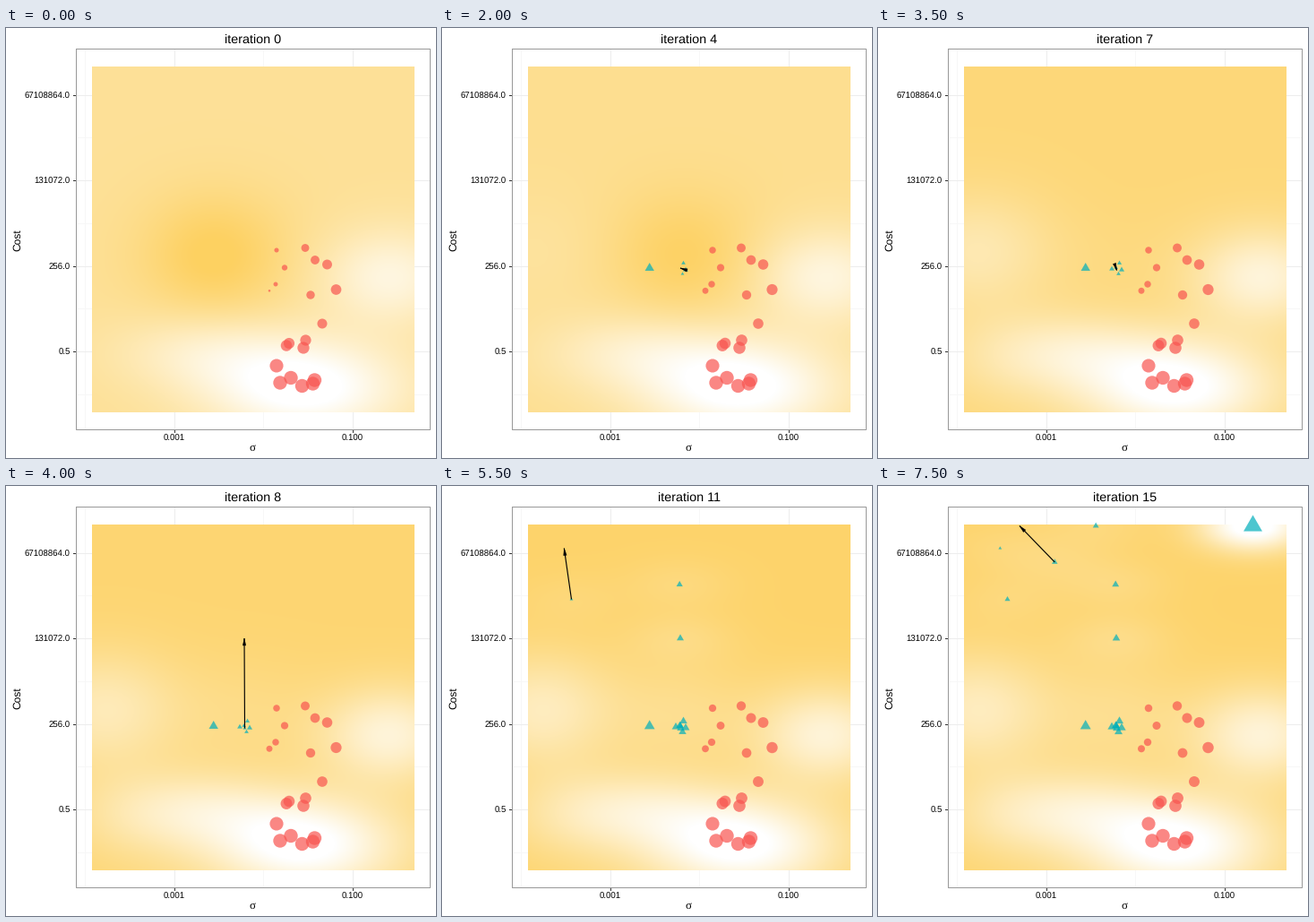
A matplotlib script for the animation above (8000 ms loop, 480 px wide and 480 px high).

```python
import numpy as np
import matplotlib.pyplot as plt
from matplotlib.animation import FuncAnimation
from matplotlib.collections import PatchCollection
from matplotlib.patches import Circle, Polygon

plt.rcParams.update({"path.snap": False, "text.hinting": "none"})

SIZE, DPI = 480, 100
PX = 72 / DPI
STEPS, STEP_MS = 16, 500
R_MIN, R_MAX = 1.28, 7.7
RED, TEAL = (0.973, 0.333, 0.314), (0.0, 0.686, 0.733)
GOLD = np.array([253, 209, 98]) / 255
LEFT, RIGHT, TOP, BOTTOM = 96, 456, 43, 429
PANEL = (78.5, 473.5, 23.5, 448.5)

# points of the initial design
DESIGN = [(302, 248), (334, 245.5), (345, 259), (358.5, 264), (311, 267.5),
          (301, 286), (294, 293.3), (340, 298), (368.5, 292), (353, 330),
          (334.5, 348.5), (332, 357), (316, 352), (313, 354.5), (302, 377),
          (318, 390.5), (306, 396), (330.5, 399.5), (344.5, 393), (342.5, 397)]
# points proposed by the optimiser, in order
PROPOSED = [(231.7, 268), (268.5, 274.5), (269.5, 262.5), (272, 270),
            (266, 268), (261, 269), (265.5, 267.5), (266.5, 270.5),
            (266, 170), (265.2, 110), (144.5, 126.5), (136.3, 69.5),
            (243.2, 44.5), (418.5, 44.5), (197.3, 85), (158, 44.5)]

# broad features: centre, spread, height before and after learning
FEATURES = [
    (428, 278, 54, 38, -.46, -.68),
    (333, 401, 78, 38, -.75, -1),
    (220, 361, 70, 30, -.30, -.42),
    (110, 250, 58, 46, 0, -.52),
    (140, 372, 58, 38, 0, -.24),
    (265, 256, 62, 46, 0, -.22),
]
GX, GY = np.meshgrid(np.arange(LEFT, RIGHT) + .5, np.arange(TOP, BOTTOM) + .5)


def ease(x, a, b):
    t = np.clip((x - a) / (b - a), 0, 1)
    return t * t * (3 - 2 * t)


def mix(a, b, t):
    return a + (b - a) * t


def bump(cx, cy, sx, sy):
    return np.exp(-((GX - cx) / sx) ** 2 / 2 - ((GY - cy) / sy) ** 2 / 2)


def loss(x, y):
    """Test function: high at the right and bottom, low in the centre and on top."""
    side = .5 * max(0, (x - 294) / 74) ** 1.25
    floor = ease(y, 318, 386)
    valley = .14 * np.exp(-((x - 266) / 17) ** 2)
    up, left = max(0, (230 - y) / 186), max(0, (268 - x) / 130)
    top = min(1, 3 * up) * (.14 + .05 * up + .045 * left)
    return 1 - (1 - side) * (1 - floor) - max(valley, top)


def surface(i, seen, low):
    learned = ease(i, 2, 10)
    depth = np.full(GX.shape, mix(.66, .94, learned))
    depth += mix(.37, 0, learned) * bump(mix(233, 269, ease(i, 0, 2)), 254, 57, 48)
    for *place, before, after in FEATURES:
        depth += mix(before, after, learned) * bump(*place)
    for x, y in seen:
        if y < 200:
            depth -= (.08 + loss(x, y) - low) * bump(x, y, 42, 20)
    return 1 - np.clip(depth, 0, 1)[..., None] * (1 - GOLD)


def radius(x, y, low):
    share = max(0, (loss(x, y) - low) / (1 - low))
    return R_MIN + (R_MAX - R_MIN) * min(1, share) ** .5


def triangle(x, y, r):
    r *= 1.1
    return Polygon([(x, y - 1.555 * r), (x - 1.347 * r, y + .778 * r),
                    (x + 1.347 * r, y + .778 * r)])


def arrow(start, tip, length=8, half=1.7):
    start, tip = np.array(start), np.array(tip)
    along = (tip - start) / np.hypot(*(tip - start))
    across = along[::-1] * (-1, 1)
    base = tip - length * along
    head = Polygon([tip, base + half * across, base - half * across],
                   facecolor="black", edgecolor="black", lw=.4 * PX, zorder=6)
    return [segment(*zip(start, tip), "black", 1.15, 6), ax.add_patch(head)]


def label(x, y, s, size, **kw):
    kw = {"ha": "center", "va": "baseline", "family": "Liberation Sans"} | kw
    return ax.text(x, y, s, fontsize=size * PX, color="black", **kw)


def segment(x, y, color, lw=1, z=4):
    return ax.plot(x, y, color=color, lw=lw * PX, solid_capstyle="butt", zorder=z)[0]


fig = plt.figure(figsize=(SIZE / DPI, SIZE / DPI), dpi=DPI, facecolor="white")
ax = fig.add_axes([0, 0, 1, 1])
ax.axis("off")

x0, x1, y0, y1 = PANEL
for k in range(4):
    color = "0.93" if k % 2 else "0.97"
    x = 88.5 + round(99.6 * k)
    segment((x, x), (y0, y1), color, z=1)
for k in range(8):
    color = "0.97" if k % 2 else "0.93"
    y = 75.5 + int(47.75 * k)
    segment((x0, x1), (y, y), color, z=1)
segment((x0, x1, x1, x0, x0), (y0, y0, y1, y1, y0), "0.6")

for k, s in enumerate(("0.001", "0.100")):
    x = 188.5 + 199 * k
    segment((x, x), (449, 452), "0.2")
    label(x - .9, 461, s, 9.7)
for k, s in enumerate(("67108864.0", "131072.0", "256.0", "0.5")):
    y = 75.5 + int(95.5 * k)
    segment((75, 78), (y, y), "0.2")
    label(71.8, y + 3.5, s, 9.6, ha="right")
label(275.5, 472, "σ", 13, family="Liberation Serif")
label(19, 236.5, "Cost", 12, rotation=90, ha="right", va="center")

image = ax.imshow(surface(0, [], 0), extent=(LEFT, RIGHT, BOTTOM, TOP),
                  interpolation="nearest", aspect="auto", zorder=2)
title = label(276, 17, "", 14.4)
ax.set_xlim(0, SIZE)
ax.set_ylim(SIZE, 0)
ax.autoscale(False)
marks = []


def update(i):
    while marks:
        marks.pop().remove()
    seen = PROPOSED[:i]
    low = min(loss(*p) for p in DESIGN + seen)
    image.set_data(surface(i, seen, low))
    title.set_text(f"iteration {i}")
    for shape, points, color in ((Circle, DESIGN, RED), (triangle, seen, TEAL)):
        shapes = [shape(p, radius(*p, low)) if shape is Circle
                  else shape(*p, radius(*p, low)) for p in points]
        if shapes:
            marks.append(ax.add_collection(PatchCollection(
                shapes, facecolor=color, edgecolor="none", alpha=.7, zorder=5)))
    if i:
        marks.extend(arrow(PROPOSED[i - 1], PROPOSED[i]))
    return [image, title, *marks]


anim = FuncAnimation(fig, update, frames=STEPS, interval=STEP_MS,
                     init_func=lambda: update(0), repeat=True, repeat_delay=0)
plt.show()
```
